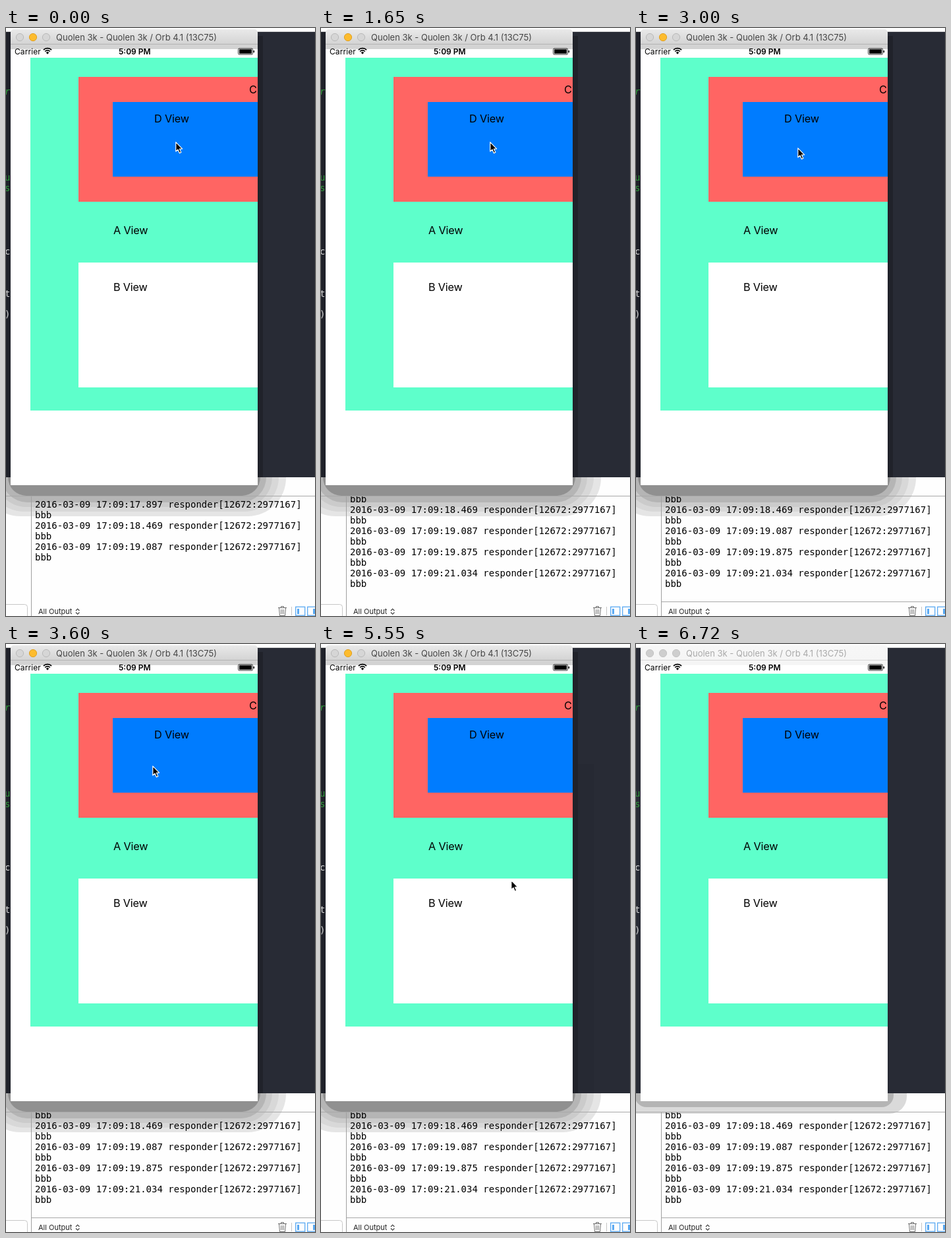
An HTML page with a canvas that plays this animation: 469x890 px, repeating every 6750 ms.

```html
<!DOCTYPE html>
<html lang="en">
<head>
<meta charset="utf-8">
<title>Responder demo</title>
<style>
html, body { margin: 0; width: 100%; height: 100%; overflow: hidden; background: #fff; }
canvas { display: block; width: 469px; height: 890px; }
</style>
</head>
<body>
<canvas id="stage" width="469" height="890"></canvas>
<script>
const ctx = document.getElementById('stage').getContext('2d');
const LOOP = 6750, STEP = 150;
const UI = 'Inter, "Open Sans", sans-serif';
const MONO = '"DejaVu Sans Mono", "Noto Sans Mono", monospace';

const stamps = ['17.897', '18.469', '19.087', '19.875', '21.034'];

// time, x, y of the pointer tip
const path = [
  [0, 257, 172], [750, 257, 172], [900, 256, 172], [1650, 256, 172],
  [2550, 242, 181], [2850, 258, 180], [3450, 204, 183], [3600, 222, 184],
  [3900, 190, 186], [4200, 307, 178], [4350, 278, 177], [4650, 277, 177],
  [5100, 219, 183], [5250, 219, 183], [5400, 232, 196], [6000, 456, 840], [6150, 480, 900]
];

// right, bottom, radius, colour; outermost first
const deepShadow = [
  [425, 739, 58, '#e5e5e5'], [414, 732, 52, '#d8d8d8'], [404, 725, 45, '#cbcbcb'],
  [395, 718, 38, '#b5b5b5'], [386, 708, 28, '#909090']
];
const softShadow = [[411, 711, 26, '#dadada'], [391, 701, 18, '#b4b4b4']];

function rect(x, y, w, h, color) {
  ctx.fillStyle = color;
  ctx.fillRect(x, y, w, h);
}

function round(x, y, w, h, r) {
  ctx.beginPath();
  ctx.roundRect(x, y, w, h, r);
}

function line(color, width, ...pts) {
  ctx.strokeStyle = color;
  ctx.lineWidth = width;
  ctx.beginPath();
  pts.forEach(([x, y], i) => i ? ctx.lineTo(x, y) : ctx.moveTo(x, y));
  ctx.stroke();
}

function text(str, x, y, font, color = '#000', spacing = 0) {
  ctx.font = font;
  ctx.letterSpacing = spacing + 'px';
  ctx.fillStyle = color;
  ctx.fillText(str, x, y);
}

function clipped(x, y, w, h, draw) {
  ctx.save();
  ctx.beginPath();
  ctx.rect(x, y, w, h);
  ctx.clip();
  draw();
  ctx.restore();
}

function pointerAt(t) {
  const i = path.findIndex(p => p[0] > t);
  if (i < 0) return null;
  const [t0, x0, y0] = path[i - 1], [t1, x1, y1] = path[i];
  const k = (t - t0) / (t1 - t0);
  return [Math.round(x0 + (x1 - x0) * k), Math.round(y0 + (y1 - y0) * k)];
}

function drawEditor(t, active) {
  rect(0, 0, 469, 890, '#fefefe');
  rect(0, 5, 469, 1, '#d0d0d0');
  rect(0, 6, 469, 674, '#282b35');
  if (active) {
    if (t >= 5400) rect(390, 182, 24, 498, '#262933');
    rect(382, 12, 8, 668, '#20222a');
    rect(0, 6, 7, 674, '#1f2129');
  }
  clipped(0, 6, 7, 674, () => {
    const font = '14px ' + MONO, green = '#2f9d3a', pale = '#d5d5d5';
    text('r', -2, 101, 'italic ' + font, green);
    text('u', -2, 231, font, green);
    text('s', -2, 247, font, green);
    text('c', -2, 343, font, pale);
    text('t', -2, 407, font, pale);
    text(')', -2, 438, font, pale);
  });
}

function drawShadow(bands) {
  clipped(0, 680, 469, 70, () => {
    for (const [right, bottom, r, color] of bands) {
      const left = 389 - right;
      round(left, 400, right - left, bottom - 400, r);
      ctx.fillStyle = color;
      ctx.fill();
    }
  });
}

function drawConsole(t) {
  rect(0, 708, 469, 1, '#a9a9a9');
  rect(38, 709, 1, 181, '#a0a0a0');
  const scrolled = t >= 1650;
  const count = scrolled ? 5 : t >= 450 ? 4 : 3;
  const top = scrolled ? 702 : 726;
  clipped(39, 709, 430, 159, () => {
    for (let i = 0; i < count; i++) {
      const y = top + i * 32;
      text('2016-03-09 17:09:' + stamps[i] + ' responder[12672:2977167]', 44, y, '14px ' + MONO);
      text('bbb', 44, y + 16, '14px ' + MONO);
    }
  });
}

function drawFooter(t) {
  if (t >= 1800) rect(39, 868, 430, 1, '#a8a8a8');
  round(-10, 872.5, 42.5, 30, 4);
  ctx.strokeStyle = '#c8c8c8';
  ctx.lineWidth = 1;
  ctx.stroke();

  text('All Output', 49, 887, '11px ' + UI, '#222');
  line('#333', 1.1, [106, 882], [108.7, 879.2], [111.4, 882]);
  line('#333', 1.1, [106, 884.5], [108.7, 887.3], [111.4, 884.5]);

  // trash can
  const gray = '#6e6e6e';
  line(gray, 1, [413, 877.5], [426, 877.5]);
  line(gray, 1, [417.5, 877], [417.5, 875.5], [421.5, 875.5], [421.5, 877]);
  line(gray, 1, [414.5, 878], [415.5, 889.5], [423.5, 889.5], [424.5, 878]);
  for (const x of [417.5, 419.5, 421.5]) line(gray, 0.8, [x, 880], [x, 887]);

  rect(433, 876, 1, 13, '#c4c4c4');
  const blue = '#5aa9f2';
  ctx.strokeStyle = blue;
  ctx.lineWidth = 1.3;
  ctx.strokeRect(439.7, 876.2, 14, 13);
  ctx.strokeRect(457.7, 876.2, 14, 13);
  rect(442, 879, 3, 8, blue);
  rect(466, 879, 3, 8, blue);
}

function drawTitleBar(active) {
  round(7, 2, 375, 30, [5, 5, 0, 0]);
  const fill = ctx.createLinearGradient(0, 2, 0, 25);
  fill.addColorStop(0, active ? '#e9e9e9' : '#f7f7f7');
  fill.addColorStop(1, active ? '#d3d3d3' : '#f5f5f5');
  ctx.fillStyle = fill;
  ctx.fill();
  rect(7, 24, 375, 1, active ? '#b4b4b4' : '#d6d6d6');

  [21, 41, 61].forEach((x, i) => {
    const lit = active && i === 1;
    ctx.beginPath();
    ctx.arc(x, 14, 5.6, 0, 7);
    ctx.fillStyle = lit ? '#fdbc2e' : active ? '#d6d6d6' : '#cecece';
    ctx.strokeStyle = lit ? '#dfa023' : active ? '#b9b9b9' : '#c3c3c3';
    ctx.lineWidth = 1;
    ctx.fill();
    ctx.stroke();
  });
  text('Quolen 3k - Quolen 3k / Orb 4.1 (13C75)', 76, 19, '13px ' + UI, active ? '#454545' : '#a9a9a9');
}

function drawStatusBar() {
  text('Carrier', 13, 40, '12px ' + UI, '#000', 0.1);
  text('5:09 PM', 171, 40, '600 12px ' + UI);

  ctx.strokeStyle = '#000';
  ctx.lineWidth = 1.7;
  for (const r of [8.6, 5.4]) {
    ctx.beginPath();
    ctx.arc(63, 39.3, r, -Math.PI * 0.75, -Math.PI * 0.25);
    ctx.stroke();
  }
  ctx.beginPath();
  ctx.moveTo(63, 39.8);
  ctx.arc(63, 39.3, 3, -Math.PI * 0.75, -Math.PI * 0.25);
  ctx.fillStyle = '#000';
  ctx.fill();

  round(352.5, 31, 22, 9, 1.5);
  ctx.lineWidth = 0.8;
  ctx.stroke();
  rect(354, 32.3, 19, 6.4, '#000');
  rect(375.6, 34, 1.4, 3.2, '#000');
}

function drawPhone(active) {
  rect(7, 25, 375, 667, '#fff');
  drawTitleBar(active);
  drawStatusBar();
  rect(37, 45, 345, 534, '#5effcb');
  rect(110, 74, 272, 189, '#ff6563');
  rect(162, 112, 220, 113, '#007cff');
  rect(110, 355, 272, 189, '#fff');
  clipped(7, 45, 375, 647, () => {
    const label = (name, x, y) => text(name + ' View', x, y, '16.3px ' + UI, '#000', -0.2);
    label('C', 369, 99);
    label('D', 225, 143);
    label('A', 163, 312);
    label('B', 163, 398);
  });
}

function drawPointer([x, y]) {
  ctx.save();
  ctx.translate(x + 0.8, y + 0.8);
  ctx.beginPath();
  ctx.moveTo(0, 0);
  ctx.lineTo(0, 14);
  ctx.lineTo(3.2, 11.2);
  ctx.lineTo(5.6, 16.6);
  ctx.lineTo(8, 15.5);
  ctx.lineTo(5.6, 10.3);
  ctx.lineTo(9.8, 10);
  ctx.closePath();
  ctx.fillStyle = '#000';
  ctx.strokeStyle = '#fff';
  ctx.lineWidth = 1.2;
  ctx.lineJoin = 'round';
  ctx.fill();
  ctx.stroke();
  ctx.restore();
}

function draw(t) {
  const active = t < 6720;
  drawEditor(t, active);
  drawShadow(active ? deepShadow : softShadow);
  drawConsole(t);
  drawFooter(t);
  drawPhone(active);
  const tip = pointerAt(Math.floor(t / STEP) * STEP);
  if (tip) drawPointer(tip);
}

const start = performance.now();
function tick() {
  draw((performance.now() - start) % LOOP);
  requestAnimationFrame(tick);
}
tick();
</script>
</body>
</html>
```
